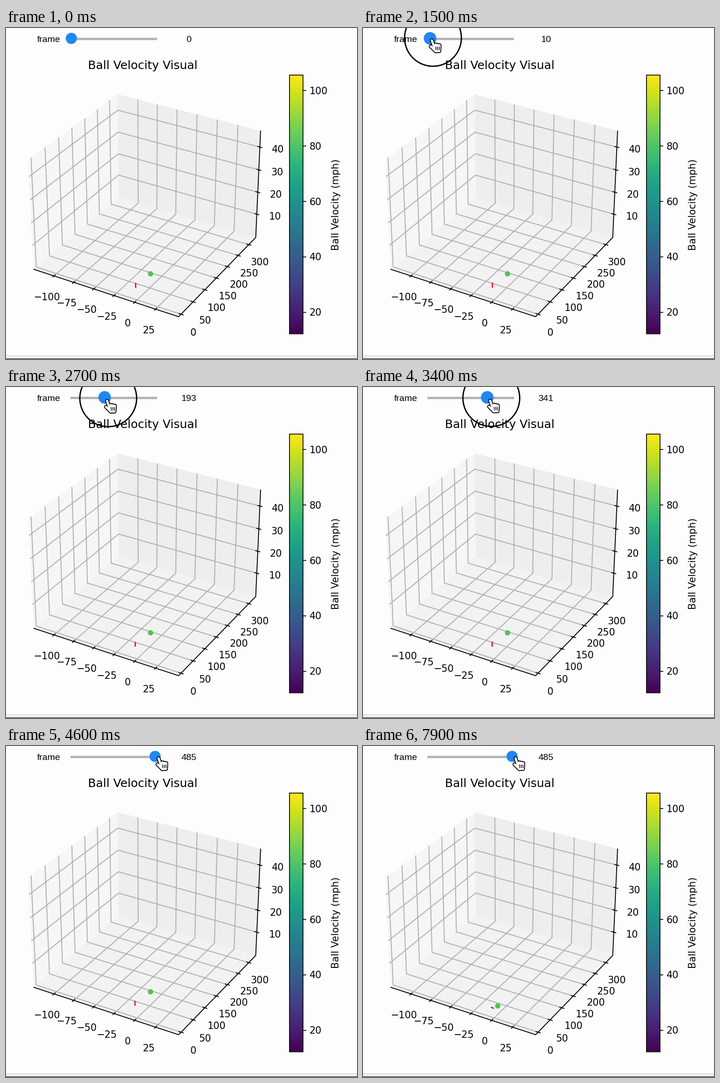
Recreate the animation shown at these times as a matplotlib script. Size 754 px wide and 710 px high, loop 8000 ms.

```python
import numpy as np
import matplotlib.pyplot as plt
from matplotlib.animation import FuncAnimation
from matplotlib.patches import Circle, Polygon, Rectangle

W, H = 754, 710
DPI = 100
PT = 72 / DPI  # points per pixel
STEP = 100
FRAMES = 80

plt.rcParams["font.family"] = "DejaVu Sans"
fig = plt.figure(figsize=(W / DPI, H / DPI), dpi=DPI, facecolor="#fdfdfd")
ax = fig.add_axes([0, 0, 1, 1])
ax.axis("off")


# ---- drawing helpers (pixel coordinates, y down) ----
def line(pts, color="black", width=1.9, z=3, cap="butt"):
    xs, ys = zip(*pts)
    return ax.plot(xs, ys, color=color, lw=width * PT, zorder=z,
                   solid_capstyle=cap, solid_joinstyle="round")[0]


def text(x, y, s, size=20.8, **kw):
    kw = {"ha": "center", "va": "baseline", "zorder": 6, **kw}
    return ax.text(x, y, s, fontsize=size * PT, **kw)


def number(x, y, value, **kw):
    return text(x, y + 7.8, str(value).replace("-", "\u2212"), **kw)


def ramp(t, start, end):
    return min(1, max(0, (t - start) / (end - start)))


# ---- 3D box seen from elevation 30, azimuth -60 ----
LIMITS = np.array([(-126.3, 52.1), (-9.9, 333.6), (-0.8, 47.1)])
LOW, HIGH = LIMITS.T
BOX = np.array([1.1904, 1.1904, 0.8928])
EL, AZ = np.radians(30), np.radians(-60)
TOWARD = np.array([np.cos(EL) * np.cos(AZ), np.cos(EL) * np.sin(AZ), np.sin(EL)])
RIGHT = np.array([-np.sin(AZ), np.cos(AZ), 0])
UP = np.cross(TOWARD, RIGHT)


def project(x, y, z):
    p = ((np.array([x, y, z]) - LOW) / (HIGH - LOW) - 0.5) * BOX
    depth = 10 - p @ TOWARD
    return 302.2 + 3000 * (p @ RIGHT) / depth, 369.3 - 3000 * (p @ UP) / depth


(X0, X1), (Y0, Y1), (Z0, Z1) = LIMITS


def path3d(*pts, **kw):
    line([project(*p) for p in pts], **kw)


def pane(color, *pts):
    ax.add_patch(Polygon([project(*p) for p in pts], fc=color, ec="none", zorder=1))


def tick(point, axis, dx, dy, value):
    reach = (HIGH - LOW) / 60 * (np.arange(3) == axis)
    path3d(point - reach, point + reach, z=4)
    px, py = project(*point)
    number(px + dx, py + dy, value)


pane("#f6f6f6", (X0, Y0, Z0), (X0, Y1, Z0), (X0, Y1, Z1), (X0, Y0, Z1))
pane("#eeeeee", (X0, Y1, Z0), (X1, Y1, Z0), (X1, Y1, Z1), (X0, Y1, Z1))
pane("#f2f2f2", (X0, Y0, Z0), (X1, Y0, Z0), (X1, Y1, Z0), (X0, Y1, Z0))

GRID = dict(color="#b0b0b0", width=2, z=2)
for x in range(-100, 26, 25):
    path3d((x, Y0, Z0), (x, Y1, Z0), (x, Y1, Z1), **GRID)
    tick((x, Y0, Z0), 1, -15, 44, x)
for y in range(0, 301, 50):
    path3d((X1, y, Z0), (X0, y, Z0), (X0, y, Z1), **GRID)
    tick((X1, y, Z0), 0, 26.5 - y / 90, 38.7 - y / 150, y)
for z in range(10, 41, 10):
    path3d((X0, Y0, z), (X0, Y1, z), (X1, Y1, z), **GRID)
    tick((X1, Y1, z), 0, 39, 4, z)
path3d((X0, Y0, Z0), (X1, Y0, Z0), (X1, Y1, Z0), (X1, Y1, Z1))

# ---- title, colour bar, page rules ----
text(293.5, 88, "Ball Velocity Visual", 25)

LEFT, TOP, WIDE, TALL = 608.5, 100.5, 29, 555
ax.imshow(np.linspace(1, 0, 256)[:, None], cmap="viridis", aspect="auto",
          extent=(LEFT, LEFT + WIDE, TOP + TALL, TOP), zorder=2)
ax.add_patch(Rectangle((LEFT, TOP), WIDE, TALL, fc="none", ec="black",
                       lw=1.7 * PT, zorder=4))
for mph in range(20, 101, 20):
    y = 609.5 - (mph - 20) * 5.94
    line([(LEFT + WIDE, y), (645, y)], width=1.7)
    number(651.5, y, mph, ha="left")
text(715, 379.3, "Ball Velocity (mph)", rotation=90, rotation_mode="anchor")

line([(0, 702.5), (W, 702.5)], "#aea8b2", 1)
line([(0, 709), (W, 709)], "#77757a", 2)

# ---- slider ----
UI = dict(fontfamily="Liberation Sans")
text(67, 30, "frame", 19.5, ha="left", **UI)
line([(138, 22.7), (324, 22.7)], "#b3b3b3", 5)
readout = text(393, 30, "0", 19.5, **UI)
knob = Circle((140, 22.3), 12, fc="#1e88f2", ec="none", zorder=5)
ax.add_patch(knob)

# ---- ball, bat ----
ball = Circle((310.5, 527.3), 5.7, fc="#55c152", ec="none", zorder=5)
ax.add_patch(ball)
bat = line([(278, 546), (278, 557)], "#fb1d1d", 3, z=5)

# ---- pointing hand: finger strokes fused into one outline ----
GAP = (np.nan, np.nan)
fingers = [(0, 3), (8, 26), GAP, (-2.2, 16), (8, 26), GAP]
creases = []
for k in range(1, 4):
    fingers += [(4 + 4.2 * k, 11 + 0.8 * k), (7 + 3 * k, 26), GAP]
    creases += [(5 + 3.6 * k, 17), (5.4 + 3.6 * k, 23.5), GAP]
hand = [(line(pts, color, width, z, "round"), np.array(pts))
        for pts, color, width, z in ((fingers, "black", 8.4, 9),
                                     (fingers, "white", 4.8, 10),
                                     (creases, "black", 1.5, 11))]
ring = Circle((0, 0), 61, fc="none", ec="black", lw=2.8 * PT, zorder=8)
ax.add_patch(ring)

ax.set_xlim(0, W)
ax.set_ylim(H, 0)


def move_slider(t):
    value = 10 * ramp(t, 1400, 1500) + 475 * ramp(t, 1834, 4081)
    pressed = 1300 <= t < 4300
    x = 140.3 + value * 180 / 485
    readout.set_text(str(round(value)))
    knob.center = (x, 22.3)
    knob.radius = 13.5 if pressed else 12

    # the pointer glides in, then drags the knob along a shallow arc
    away = (1 - ramp(t, 800, 1200)) ** 2
    cx = 150.3 + (x - 144) * 1.02 - 75 * away
    cy = 20.8 + 3.5 * np.sin(np.pi * value / 485) - 40 * away
    ring.center = (cx, cy)
    ring.set_visible(pressed)
    for stroke, pts in hand:
        stroke.set_data(*(pts + (cx - 2.5, cy + 2.5)).T)
        stroke.set_visible(t >= 800)


def move_ball(t):
    s = max(0, t - 5200) / 1000
    ball.center = (310.5 - 7.8 * s, 527.3 + 6 * s + 1.9 * s * s)


def move_bat(t):
    # barely turns at first, then swings down to the left
    u = t / 7900
    swing = u ** 10
    angle = 1.1 * u ** 5.5
    length = 10.7 - 3.5 * swing
    x, y = 278.2 - 1.5 * u + 4.5 * swing, 557 + 6.2 * swing
    bat.set_data([x, x - length * np.sin(angle)], [y, y - length * np.cos(angle)])


def update(i):
    t = i * STEP
    move_slider(t)
    move_ball(t)
    move_bat(t)
    return []


anim = FuncAnimation(fig, update, frames=FRAMES, interval=STEP,
                     repeat=True, repeat_delay=0, blit=False)
plt.show()
```
